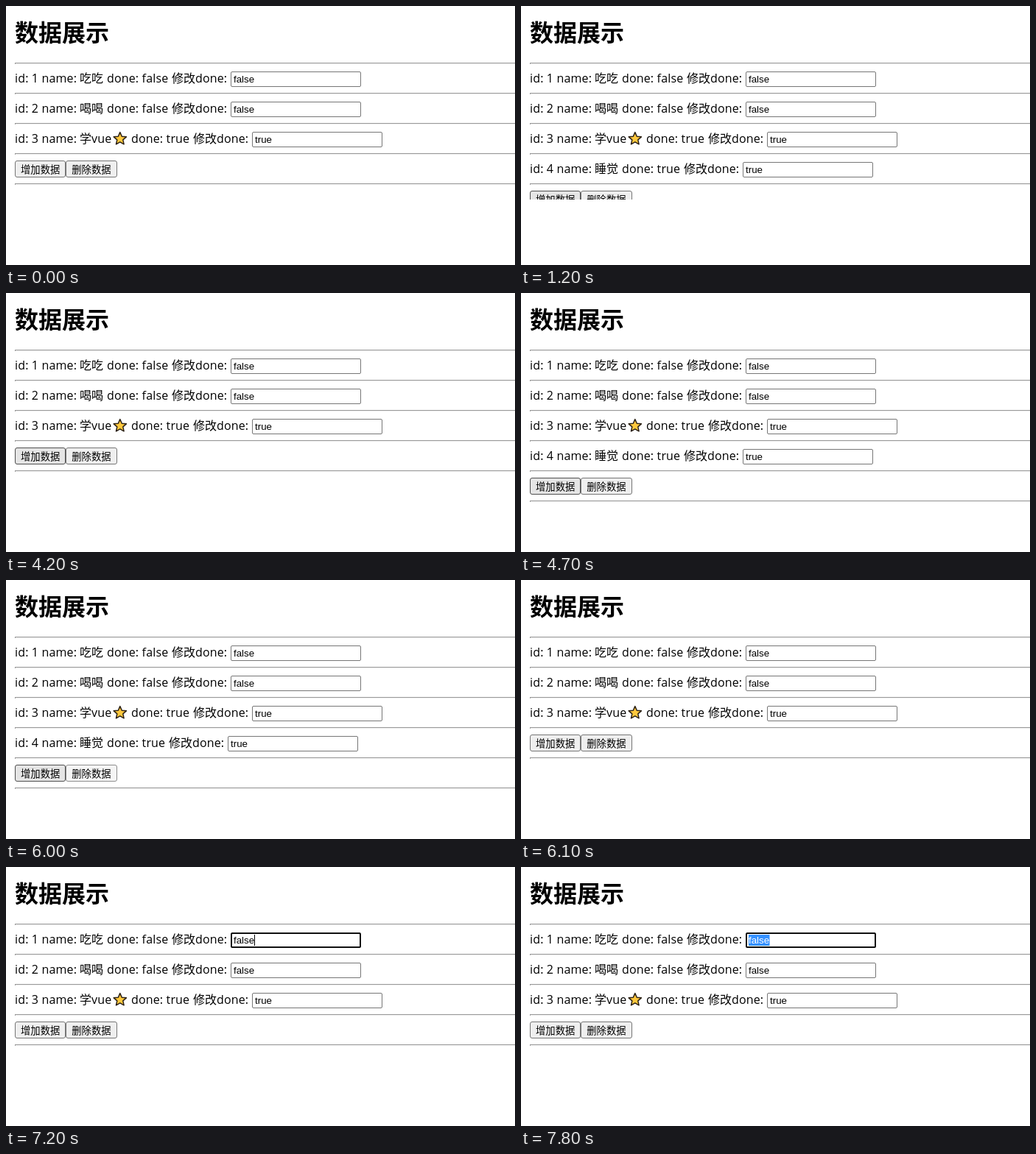
Write an HTML page that moves like this. It is 691 px wide and 352 px high and loops after 8000 ms.

```html
<!DOCTYPE html>
<html lang="zh-CN">
<head>
<meta charset="utf-8">
<title>数据展示</title>
<style>
  html, body { margin: 0; width: 100%; height: 100%; overflow: hidden; background: #fff; }
  svg { display: block; }
  text { white-space: pre; }
  .zh, h1 { font-family: "Noto Sans CJK SC", "Noto Sans CJK", "Noto Sans CJK JP", sans-serif; }
  .row { font-size: 16px; }
  .en { font-family: "Open Sans", "Noto Sans", sans-serif; letter-spacing: .15px; }
  .title { font-size: 32px; font-weight: 700; }
  .value { font: 13.333px "Liberation Sans", Arial, sans-serif; }
  .label { font-size: 13.333px; }
</style>
</head>
<body>
<svg id="stage" width="691" height="352" viewBox="0 0 691 352"></svg>
<script>
const LOOP = 8000, PITCH = 41;
const stage = document.getElementById('stage');

function add(parent, tag, attrs, content) {
  const node = document.createElementNS('http://www.w3.org/2000/svg', tag);
  for (const key in attrs) node.setAttribute(key, attrs[key]);
  if (content) node.textContent = content;
  parent.append(node);
  return node;
}
const set = (node, attrs) => {
  for (const key in attrs) node.setAttribute(key, attrs[key]);
};
const show = (node, on) => node.setAttribute('visibility', on ? 'visible' : 'hidden');
const write = (parent, x, y, cls, content) =>
  add(parent, 'text', { x, y, class: cls }, content);

function rule(parent, y) {
  add(parent, 'rect', { x: 12, y, width: 679, height: 1, fill: '#9a9a9a' });
  add(parent, 'rect', { x: 12, y: y + 1, width: 679, height: 1, fill: '#eee' });
  add(parent, 'rect', { x: 12, y, width: 1, height: 2, fill: '#9a9a9a' });
}

function star(parent, cx, cy) {
  const point = i => {
    const r = i % 2 ? 4.2 : 9, a = (i * 36 - 90) * Math.PI / 180;
    return [cx + r * Math.cos(a), cy + r * Math.sin(a)].map(v => v.toFixed(2)).join();
  };
  const ring = Array.from({ length: 10 }, (_, i) => point(i));
  add(parent, 'polygon', { points: ring.join(' '), fill: '#ffc83d', stroke: '#2b2115',
    'stroke-width': 1.5, 'stroke-linejoin': 'round' });
}

// One list line: name, done value, and the x of "done", "修改" and the input.
function addRow(i, name, done, doneX, editX, inputX) {
  const g = add(stage, 'g', {}), y = 104 + PITCH * i, top = 89 + PITCH * i;
  write(g, 12, y, 'row en', `id: ${i + 1} name:`);
  write(g, 100, y, 'row zh', name);
  write(g, doneX, y, 'row en', `done: ${done}`);
  write(g, editX, y, 'row zh', '修改');
  write(g, editX + 32, y, 'row en', 'done:');
  const box = add(g, 'rect', { x: inputX + .5, y: top + .5, width: 176, height: 20,
    rx: 1.5, fill: '#fff', stroke: '#767676' });
  write(g, inputX + 4, y, 'value', done);
  return { g, box };
}

const SKIN = {
  normal: { fill: '#efefef', stroke: '#767676' },
  hover: { fill: '#e5e5e5', stroke: '#4f4f4f' },
  active: { fill: '#f5f5f5', stroke: '#8d8d8d' }
};

function addButton(parent, x, width, textX, label) {
  const box = add(parent, 'rect', { x: x + .5, y: 210.5, width: width - 1, height: 22, rx: 2.5 });
  write(parent, textX, 227, 'label zh', label);
  return box;
}

write(stage, 12, 48, 'title zh', '数据展示');
for (let i = 0; i < 5; i++) rule(stage, 77 + PITCH * i);

const rows = [
  addRow(0, '吃吃', 'false', 137, 225, 305),
  addRow(1, '喝喝', 'false', 137, 225, 305),
  addRow(2, '学', 'true', 170, 254, 334),
  addRow(3, '睡觉', 'true', 137, 221, 301)
];
write(rows[2].g, 116, 186, 'row en', 'vue');
star(rows[2].g, 154.8, 180.6);

const bar = add(stage, 'g', {});
const addBtn = addButton(bar, 12, 69, 20, '增加数据');
const delBtn = addButton(bar, 81, 70, 89.3, '删除数据');
const lastRule = add(stage, 'g', {});
rule(lastRule, 282);
const cover = add(stage, 'rect', { x: 0, y: 263, width: 691, height: 89, fill: '#fff' });

const focus = add(stage, 'rect', { x: 306, y: 90, width: 175, height: 19, rx: 1.5,
  fill: 'none', stroke: '#101010', 'stroke-width': 2 });
const caret = add(stage, 'rect', { x: 337, y: 92, width: 1, height: 15 });
const mark = add(stage, 'svg', { y: 92, height: 15, overflow: 'hidden' });
add(mark, 'rect', { width: 40, height: 15, fill: '#3390ff' });
const marked = add(mark, 'text', { y: 12, class: 'value', fill: '#fff' }, 'false');

// Each track lists [time, value] and holds its value until the next step.
const tracks = {
  list: [[0, 'three'], [1200, 'partial'], [3600, 'three'], [4700, 'four'], [6100, 'three']],
  add: [[0, 'normal'], [700, 'hover'], [3600, 'normal'], [4200, 'hover'],
        [4600, 'active'], [4700, 'hover'], [6100, 'normal']],
  del: [[0, 'normal'], [5500, 'hover'], [6000, 'active'], [6100, 'normal']],
  input: [[0, -1], [3700, 0], [3800, -1], [6500, 1], [6600, 0], [6700, -1]],
  focus: [[0, false], [7200, true]],
  select: [[0, 338], [7400, 329.7], [7500, 320.1], [7600, 312.7], [7800, 309]]
};
const at = (track, t) => track.filter(step => step[0] <= t).pop()[1];

function draw(t) {
  const list = at(tracks.list, t), extra = list !== 'three';
  show(rows[3].g, extra);
  show(lastRule, list === 'four');
  show(cover, list === 'partial');
  set(bar, { transform: `translate(0 ${extra ? PITCH : 0})` });
  set(addBtn, SKIN[at(tracks.add, t)]);
  set(delBtn, SKIN[at(tracks.del, t)]);

  const over = at(tracks.input, t);
  rows.forEach((row, i) => set(row.box, { stroke: i === over ? '#4f4f4f' : '#767676' }));

  const focused = at(tracks.focus, t), start = at(tracks.select, t);
  show(focus, focused);
  show(caret, focused && start === 338);
  show(mark, start < 338);
  set(mark, { x: start, width: Math.max(0, 337.5 - start) });
  set(marked, { x: 309 - start });
}

function tick() {
  draw(performance.now() % LOOP);
  requestAnimationFrame(tick);
}
tick();
</script>
</body>
</html>
```
